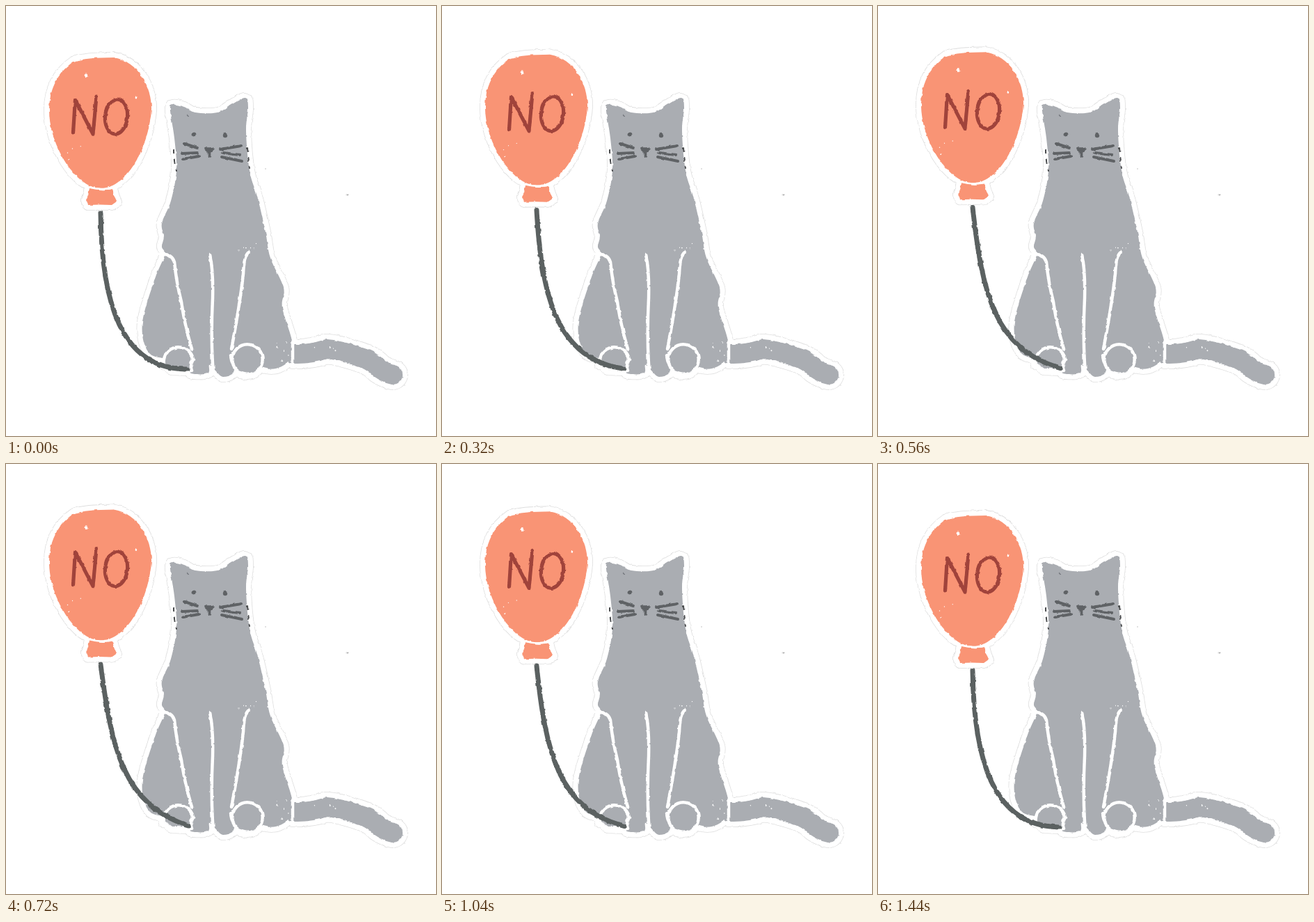
These frames come from a looping animation (618 by 618 pixels, 1.52 s). An HTML page:

```html
<!DOCTYPE html>
<html lang="en">
<head>
<meta charset="utf-8">
<title>Cat with balloon</title>
<style>
html, body { margin: 0; width: 100%; height: 100%; overflow: hidden; background: #fff; }
svg { display: block; width: 100vw; height: 100vh; }
path { fill: none; stroke-linejoin: round; stroke-linecap: round; }
.edge { stroke: #dedede; stroke-width: 16; }
.halo { fill: #fff; stroke: #fff; stroke-width: 14.4; }
.tail { stroke: #aaadb2; stroke-width: 28; }
.tail.edge { stroke: #dedede; stroke-width: 44; }
.tail.halo { fill: none; stroke: #fff; stroke-width: 42.4; }
.fur { fill: #aaadb2; }
.gap { stroke: #fff; stroke-width: 4.5; }
.face { stroke: #5f6265; stroke-width: 4; }
.nose { fill: #5f6265; stroke: #5f6265; stroke-width: 3.6; }
.neck { stroke: #484a4c; stroke-width: 2; stroke-dasharray: 5 9; }
.rubber { fill: #f99475; }
.word { stroke: #a0433b; stroke-width: 5.2; }
.string { stroke: #5b6161; stroke-width: 7; }
</style>
</head>
<body>
<svg viewBox="0 0 618 618" role="img" aria-label="A grey cat beside a balloon that says NO">
  <defs>
    <filter id="rough" filterUnits="userSpaceOnUse" x="0" y="0" width="618" height="618" color-interpolation-filters="sRGB">
      <feTurbulence type="fractalNoise" baseFrequency="0.13" numOctaves="2" seed="4"/>
      <feDisplacementMap in="SourceGraphic" scale="3.2" xChannelSelector="R" yChannelSelector="G"/>
    </filter>
  </defs>
  <g id="cat" filter="url(#rough)"></g>
  <g id="balloon" filter="url(#rough)"></g>
  <g filter="url(#rough)"><path id="string" class="string"/></g>
</svg>
<script>
const $ = id => document.getElementById(id);
const STEP = 80, COUNT = 19;

// Smooth closed outline through a few points
function outline(text) {
  const pts = text.trim().split(/\s+/).map(p => p.split(',').map(Number));
  const at = i => pts[(i + pts.length) % pts.length];
  return 'M' + pts[0] + pts.map((b, i) => {
    const a = at(i - 1), c = at(i + 1), e = at(i + 2);
    const p = b.map((v, k) => v + (c[k] - a[k]) / 6);
    const q = c.map((v, k) => v - (e[k] - b[k]) / 6);
    return `C${p} ${q} ${c}`;
  }).join('') + 'Z';
}

const path = (cls, d) => `<path class="${cls}" d="${d}"/>`;
const dot = (x, y, r, fill) => `<circle cx="${x}" cy="${y}" r="${r}" fill="${fill}"/>`;
const round = (x, y, r) => `M${x - r},${y}a${r},${r} 0 1 1 ${2 * r},0a${r},${r} 0 1 1 ${-2 * r},0Z`;
const layer = (cls, parts) => parts.map(d => path(cls, d)).join('');

let seed = 7;
const random = () => (seed = seed * 16807 % 2147483647) / 2147483647;

function specks(n, x, y, w, h) {
  let out = '';
  while (n--) out += dot(x + w * random(), y + h * random(), 0.5 + 0.5 * random(), '#fff');
  return out;
}

const body = outline(`236,150 240,142 256,145 272,153 304,153 325,141 344,132 348,146
  345,180 350,237 362,277 373,325 380,362 399,405 397,433 411,481 409,505 394,519
  370,520 326,500 322,510 329,525 312,533 299,522 292,516 290,528 266,528 264,518
  266,506 225,506 203,495 196,455 214,392 228,358 224,346 227,331 224,312 237,280
  245,236 242,190`);
const leftPaw = 'M227,515A21,21 0 0 1 269,508Q264,516 267,524L238,523Z';
const rightPaw = round(347, 508, 21.7);
const tail = 'M414,500Q436,501 461,493Q478,494 516,507Q528,512 536,521Q546,528 556,530';
const catParts = [body, leftPaw, rightPaw];

$('cat').innerHTML =
  path('tail edge', tail) + layer('edge', catParts) +
  path('tail halo', tail) + layer('halo', catParts) +
  path('tail', tail) + path('fur', body) +
  layer('gap', [
    'M221,357Q238,355 242,368Q245,398 252,425Q256,455 267,493',
    'M293,357Q298,380 297,420Q294,480 298,528',
    'M349,354Q342,358 341,385Q336,430 324,493',
    'M412,485V517'
  ]) +
  layer('fur gap', [leftPaw, rightPaw]) +
  path('face', 'M257,198L275,204M253,212L275,211M254,220L277,216') +
  path('face', 'M308,206L338,201M312,211L336,214M310,217L339,223') +
  path('nose', 'M287,205H298L292.5,210ZM292.5,210V217') +
  dot(270, 185, 3.4, '#5f6265') + dot(315, 186, 3.2, '#5f6265') +
  path('neck', 'M241,207Q241,224 245,237') + path('neck', 'M347,204L350,234') +
  specks(6, 335, 338, 30, 14) + specks(6, 380, 480, 28, 32) + specks(4, 440, 488, 60, 10) +
  dot(261, 157, 1.2, '#777b80') + dot(373, 234, 0.8, '#bbb') + dot(491, 272, 1.4, '#aaa');

const bulb = 'M97,80Q115,74 155,74C190,80 209,115 209,148C206,200 175,262 136,262' +
  'C100,262 62,200 62,150C62,115 78,93 97,80Z';
const knot = 'M120,262Q136,266 153,263Q155,274 159,281L152,286Q135,285 118,286L115,279Q119,271 120,262Z';

$('balloon').innerHTML =
  ['edge', 'halo', 'rubber'].map(cls => layer(cls, [bulb, knot])).join('') +
  '<path d="M119,260Q136,265 153,262" stroke="#fff" stroke-width="2"/>' +
  path('word', 'M96.5,182L99.5,135L125,184L130,130') +
  '<ellipse class="word" fill="none" cx="158.5" cy="159" rx="16" ry="25" transform="rotate(6 158 159)"/>' +
  dot(115, 100, 2.4, '#fff') + dot(187, 132, 1.4, '#fff') + specks(4, 80, 200, 30, 30);

// Height of the float, 0 at rest to 1 at the top
const rise = step => Math.max(0, Math.sin(Math.PI * step / (COUNT - 1))) ** 1.5;

function draw(ms) {
  const step = Math.floor(ms / STEP) % COUNT;
  const pull = rise(step - 0.7); // the string trails the balloon
  const mix = (a, b) => (a + (b - a) * pull).toFixed(2);
  $('balloon').setAttribute('transform', `translate(0 ${(-8.4 * rise(step)).toFixed(2)})`);
  $('string').setAttribute('d',
    `M136,${mix(297, 288)}C${mix(137, 152)},${mix(425, 410)} ` +
    `${mix(165, 168)},${mix(522, 488)} ${mix(260, 262)},${mix(522, 520)}`);
}

let start;
function tick(now) {
  start ??= now;
  draw(now - start);
  requestAnimationFrame(tick);
}
draw(0);
requestAnimationFrame(tick);
</script>
</body>
</html>
```
